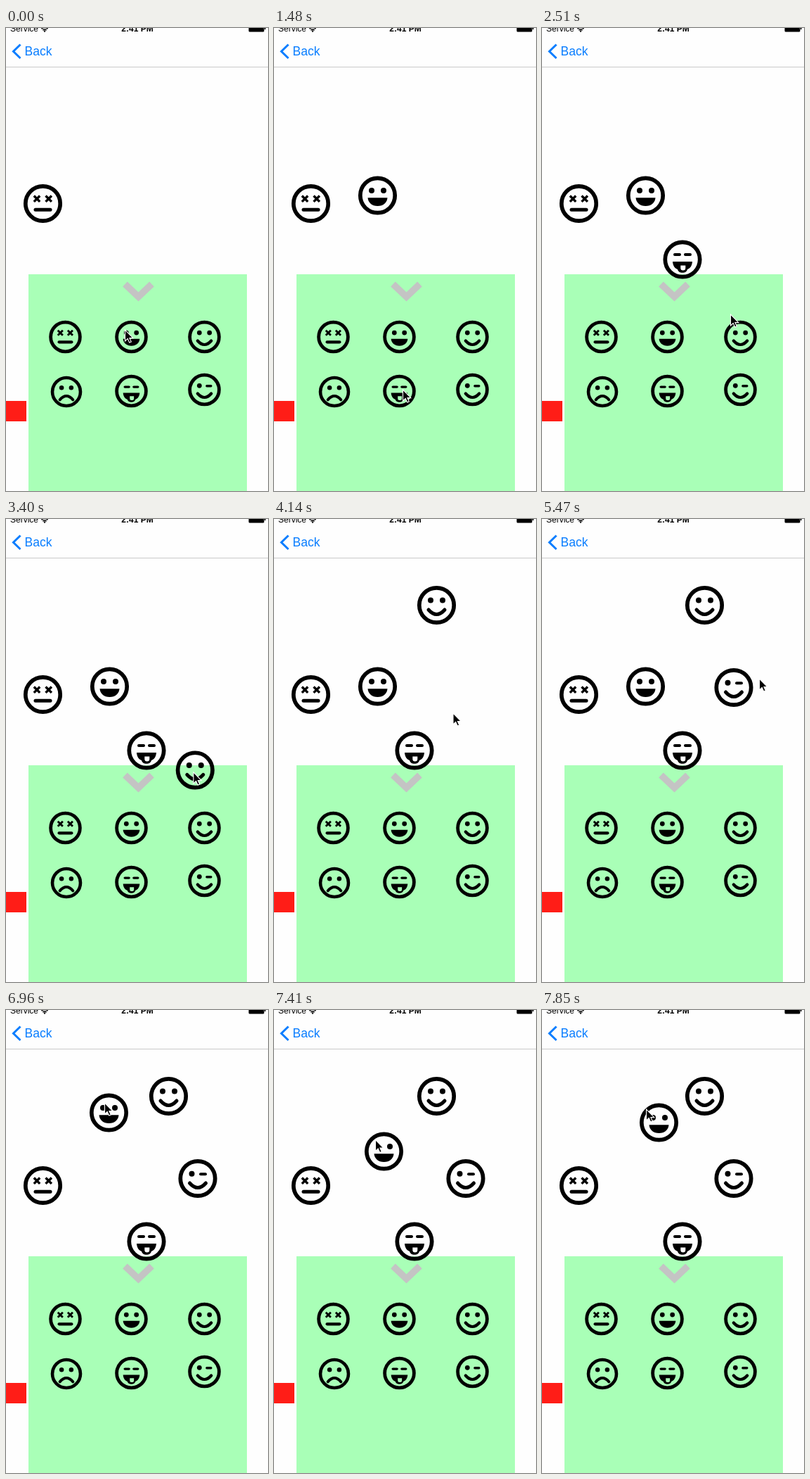
Recreate the animation shown at these times as an HTML page. Size 373 px wide and 658 px high, loop 8 s.

```html
<!DOCTYPE html>
<html lang="en">
<head>
<meta charset="utf-8">
<title>Sticker picker</title>
<style>
  html, body { margin: 0; width: 100%; height: 100%; overflow: hidden; background: #fefefe; }
  svg { display: block; width: 100%; height: 100%; }
  text { font-family: "Liberation Sans", Arial, sans-serif; }
  .line { fill: none; stroke: #000; stroke-width: 5; stroke-linecap: round; }
  .dash { fill: none; stroke: #000; stroke-width: 4; stroke-linecap: round; }
  .cross { fill: none; stroke: #000; stroke-width: 3.4; }
</style>
</head>
<body>
<svg viewBox="0 0 373 658">
  <defs>
    <circle id="ring" r="24.7" fill="none" stroke="#000" stroke-width="5.7"/>
    <circle id="eye" r="4"/>
    <g id="eyes"><use href="#eye" x="-8.5" y="-7"/><use href="#eye" x="8.5" y="-7"/></g>
    <path id="curve" class="line" d="M-11.5 6.5Q0 19.5 11.5 6.5"/>
    <path id="x" class="cross" d="M-4.2-4.2L4.2 4.2M4.2-4.2L-4.2 4.2"/>
    <g id="dead">
      <use href="#ring"/><use href="#x" x="-8.5" y="-6.8"/><use href="#x" x="8.2" y="-6.8"/>
      <path class="line" d="M-10.5 8.7h21"/>
    </g>
    <g id="grin">
      <use href="#ring"/><use href="#eyes"/>
      <path d="M-14 3.3H14C13.5 10.5 8 15 0 15S-13.5 10.5-14 3.3Z"/>
    </g>
    <g id="smile"><use href="#ring"/><use href="#eyes"/><use href="#curve"/></g>
    <g id="sad">
      <use href="#ring"/><use href="#eyes"/>
      <use href="#curve" transform="translate(0 20.5) scale(1 -1)"/>
    </g>
    <g id="tongue">
      <use href="#ring"/>
      <path class="dash" d="M-11-7h7M4-7h7"/>
      <path fill-rule="evenodd" d="M-14 3H14C13.5 9 11 12.5 7 14C6 17.5 3.5 18.7 0 18.7S-6 17.5-7 14C-11 12.5-13.5 9-14 3ZM-2.7 8.5V12A3.5 3.5 0 0 0 4.3 12V8.5Z"/>
    </g>
    <g id="wink">
      <use href="#ring"/><use href="#eye" x="-8.5" y="-6.7"/>
      <path class="dash" d="M4-6.2h7"/><use href="#curve"/>
    </g>
  </defs>

  <rect width="373" height="658" fill="#fefefe"/>
  <text x="6" y="5" font-size="12">Service</text>
  <path d="M50.5 1.2Q55-2.8 59.5 1.2M52.4 3.2Q55 .8 57.6 3.2" fill="none" stroke="#000" stroke-width="1.6"/>
  <circle cx="55" cy="4.5" r="1.2"/>
  <text x="187" y="5" font-size="12" font-weight="bold" text-anchor="middle">2:41 PM</text>
  <rect x="345.5" y="-5" width="22" height="10.5" rx="1.5"/>
  <rect x="368" y="-2" width="1.5" height="4"/>
  <path d="M20.5 23.5L10.5 33.2L20.5 43" fill="none" stroke="#087dff" stroke-width="3"/>
  <text x="26.5" y="39" font-size="17.5" fill="#087dff">Back</text>
  <path d="M0 55.5H373" stroke="#c9c9c9"/>

  <rect y="530" width="29" height="29" fill="#ff1d17"/>
  <rect x="32" y="350" width="311" height="308" fill="#a9ffb7"/>
  <path d="M169.5 364L188.5 382L207.5 364" fill="none" stroke="#c4c4c4" stroke-width="9.5"/>
  <g id="faces"></g>
  <g id="cursor">
    <path d="M-.5-1V15L3.2 11.5L5.7 17L8.3 15.9L5.9 10.6H10.8Z" stroke="#fff" stroke-width="1.1"/>
  </g>
</svg>
<script>
const LOOP = 8000, TICK = 148.15, LAST = 53;
const layer = document.getElementById("faces");
const cursor = document.getElementById("cursor");

function place(el, [x, y], size = 55) {
  el.setAttribute("transform", `translate(${x} ${y}) scale(${size / 55})`);
}

function addFace(kind, pos, size) {
  const el = document.createElementNS("http://www.w3.org/2000/svg", "use");
  el.setAttribute("href", "#" + kind);
  layer.append(el);
  place(el, pos, size);
  return el;
}

const palette = {
  dead: [84.5, 439], grin: [178.5, 439], smile: [282.5, 439],
  sad: [86, 517], tongue: [178.5, 516], wink: [282.5, 514]
};
for (const kind in palette) addFace(kind, palette[kind], kind === "sad" ? 44.5 : 46.5);
addFace("dead", [52.5, 249.5]);

// Detours added to a straight move; both vanish at its ends.
const bow = (dx, dy) => p => [dx * Math.sin(Math.PI * p), dy * Math.sin(Math.PI * p)];
const swirl = p => {
  const a = 2 * Math.PI * p;
  return [-58 * Math.sin(a), 24 * (1 - Math.cos(a)) - 40 * Math.sin(a)];
};

const move = (from, to, x, y, detour = bow(0, 0)) => ({ from, to, end: [x, y], detour });

const pointer = [
  move(2, 6, 151, 233),
  move(6, 10, 184, 515, bow(45, -110)),
  move(11, 14, 205, 322, bow(-25, 0)),
  move(14, 15, 236, 319),
  move(16, 17, 269, 408),
  move(17, 20, 278, 447, bow(14, 12)),
  move(22, 25, 237, 115),
  move(25, 26, 260, 113),
  move(27, 28, 255.5, 277),
  move(28, 32, 284, 508),
  move(33, 36, 281, 234),
  move(36, 37, 310, 228),
  move(39, 43, 144, 237),
  move(45, 47, 141, 133),
  move(47, 53, 149, 142, swirl)
];

const stickers = [
  ["grin", move(2, 6, 147.5, 238), move(45, 47, 146.5, 146), move(47, 53, 166.5, 160, swirl)],
  ["tongue", move(11, 14, 200, 329, bow(-25, 0))],
  ["smile", move(22, 25, 231.5, 122.5)],
  ["wink", move(33, 36, 273, 239.5, bow(-14, 0))]
].map(([kind, ...moves]) => ({ el: addFace(kind, palette[kind]), home: palette[kind], moves }));

const ease = p => p * p * (3 - 2 * p);

function follow(moves, pos, tick) {
  for (const { from, to, end, detour } of moves) {
    if (tick <= from) break;
    const p = Math.min(1, (tick - from) / (to - from));
    const d = detour(p);
    pos = pos.map((v, i) => v + (end[i] - v) * ease(p) + d[i]);
  }
  return pos;
}

function draw(t) {
  // The screen refreshes in discrete steps.
  const tick = Math.min(LAST, Math.floor((t + 14) / TICK));
  for (const { el, home, moves } of stickers) {
    el.style.display = tick > moves[0].from ? "" : "none";
    place(el, follow(moves, home, tick));
  }
  place(cursor, follow(pointer, [170, 430], tick));
}

const start = performance.now();
function loop() {
  draw((performance.now() - start) % LOOP);
  requestAnimationFrame(loop);
}
loop();
</script>
</body>
</html>
```
